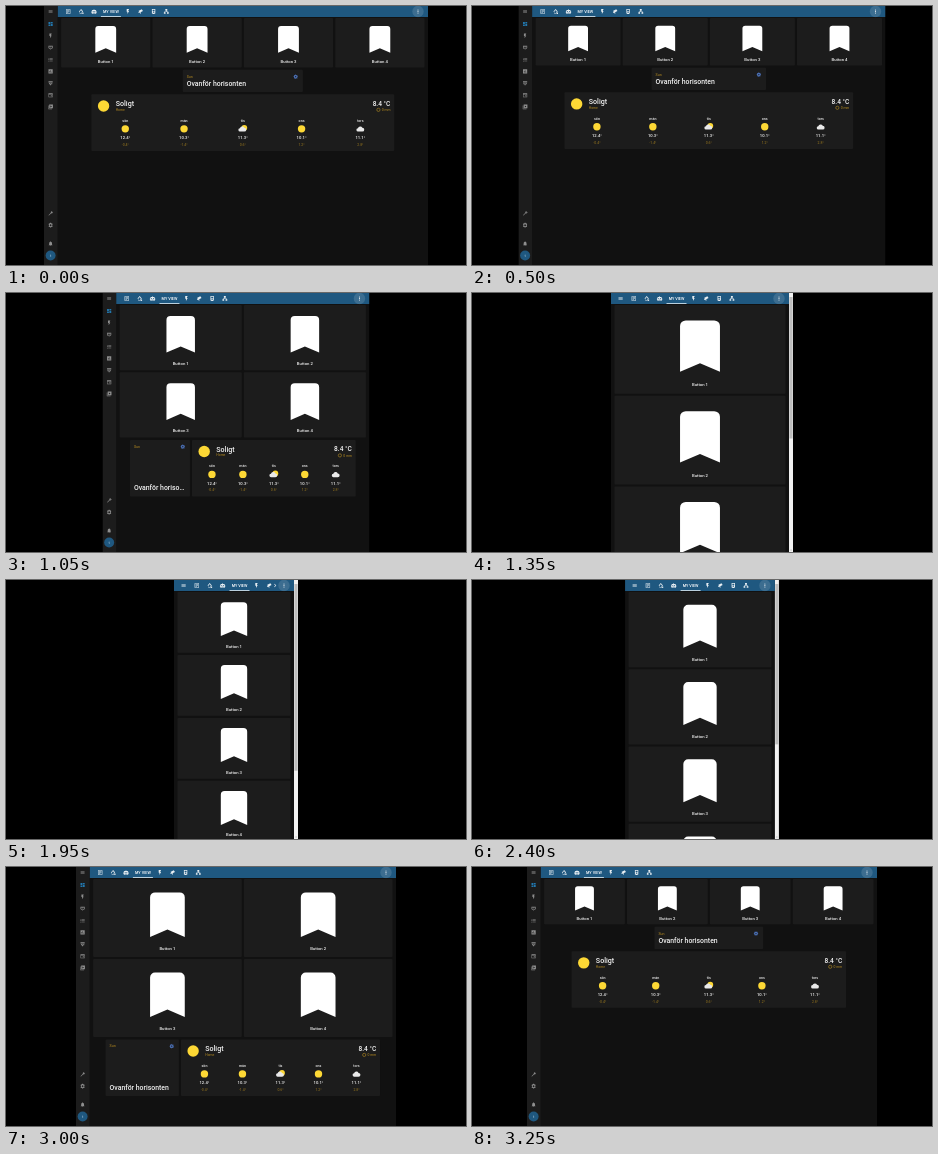
Animation, 460 px wide and 259 px high, one loop 3300 ms. Source, as an HTML page with a canvas:

```html
<!DOCTYPE html>
<html lang="sv">
<head>
<meta charset="utf-8">
<title>Responsive dashboard</title>
<style>
html, body { margin: 0; width: 100%; height: 100%; overflow: hidden; background: #000; }
canvas { display: block; width: 460px; height: 259px; }
</style>
</head>
<body>
<canvas id="stage"></canvas>
<script>
const W = 460, H = 259, LOOP = 3300, STEP = 50;
const canvas = document.getElementById('stage');
const ctx = canvas.getContext('2d');
const dpr = window.devicePixelRatio || 1;
canvas.width = W * dpr;
canvas.height = H * dpr;

const BAR = '#1f5880', PAGE = '#111', CARD = '#1c1c1c', GOLD = '#b88d20', SUN = '#fdd835', GREY = '#8f8f8f';
const RAIL = 13.6, PAD = 3.5, GAP = 2.1, TOP = 12;

// 24-unit icon shapes
const shapes = {
  bookmark: 'M17 3H7A2 2 0 0 0 5 5V21L12 18L19 21V5A2 2 0 0 0 17 3Z',
  menu: 'M3 6H21V8H3ZM3 11H21V13H3ZM3 16H21V18H3Z',
  board: 'M13 3V9H21V3ZM13 21H21V11H13ZM3 21H11V15H3ZM3 13H11V3H3Z',
  flash: 'M7 2V13H10V22L17 10H13L17 2Z',
  list: 'M3 3H21V21H3ZM5 5V19H19V5ZM7 7H17V9H7ZM7 11H17V13H7ZM7 15H13V17H7Z',
  lamp: 'M12 2L20 11V14H18V20H6V14H4V11ZM11 7L7 12V18H14V13H17V11ZM15 16H22V22H15Z',
  robot: 'M11 2H13V6H18A3 3 0 0 1 21 9V12H23V17H21V21H3V17H1V12H3V9A3 3 0 0 1 6 6H11ZM7 10V14H10V10ZM14 10V14H17V10ZM7 17V19H17V17Z',
  camera: 'M2 10L16 3L21 10L11 15L13 20H9L7 16L3 18L2 15L6 13Z',
  server: 'M5 2H19V20H16V22H8V20H5ZM8 5V10H16V5ZM9 12V17H15V12Z',
  network: 'M8 2H16V9H13V12H20V15H22V21H15V15H18V14H6V15H9V21H2V15H4V12H11V9H8Z',
  badge: 'M3 4H21V13L17 18H14L12 21L10 18H7L3 13ZM6 7V12L8 15H16L18 12V7ZM8 8H16V10H8Z',
  rows: 'M3 5H6V8H3ZM8 5H21V7H8ZM3 11H6V14H3ZM8 11H21V13H8ZM3 17H6V20H3ZM8 17H21V19H8Z',
  chart: 'M3 3H21V21H3ZM7 10V17H9V10ZM11 7V17H13V7ZM15 13V17H17V13Z',
  store: 'M3 3H21V9H3ZM5 11H19V16H14V21H10V16H5ZM8 12V14H16V12Z',
  calendar: 'M3 4H21V21H3ZM5 9V19H19V9ZM13 13H17V17H13Z',
  media: 'M6 2H22V18H6ZM11 6V14L18 10ZM2 6H4V20H18V22H2Z',
  wrench: 'M3 19L13 9A5 5 0 0 1 20 3L17 6L19 8L22 5A5 5 0 0 1 15 11L5 21Z',
  cog: 'M10 2H14L15 5L18 4L21 8L19 10V14L21 16L18 20L15 19L14 22H10L9 19L6 20L3 16L5 14V10L3 8L6 4L9 5ZM12 8A4 4 0 0 0 12 16A4 4 0 0 0 12 8Z',
  bell: 'M11 2H13V4A6 6 0 0 1 18 10V16L20 18V19H4V18L6 16V10A6 6 0 0 1 11 4ZM10 20H14A2 2 0 0 1 10 20Z',
  more: 'M12 4A2 2 0 0 0 12 8A2 2 0 0 0 12 4ZM12 10A2 2 0 0 0 12 14A2 2 0 0 0 12 10ZM12 16A2 2 0 0 0 12 20A2 2 0 0 0 12 16Z',
  next: 'M8 6L10 4L18 12L10 20L8 18L14 12Z',
  bright: 'M12 1L15 5L20 4L19 9L23 12L19 15L20 20L15 19L12 23L9 19L4 20L5 15L1 12L5 9L4 4L9 5ZM12 9A3 3 0 0 0 12 15A3 3 0 0 0 12 9Z',
  cloud: 'M6 20A5 5 0 0 1 5 10A7 7 0 0 1 18 9A5.5 5.5 0 0 1 18 20Z'
};
const paths = {};
for (const k in shapes) paths[k] = new Path2D(shapes[k]);

const days = [
  ['sön', 'sun', '12.4°', '-0.4°'],
  ['mån', 'sun', '10.3°', '-1.4°'],
  ['tis', 'partly', '11.3°', '0.6°'],
  ['ons', 'sun', '10.1°', '1.2°'],
  ['tors', 'cloud', '11.1°', '2.8°']
];

// window width over time
const keys = [[0, 384], [550, 364], [750, 322], [1100, 256], [1350, 182], [1650, 128],
  [1950, 124], [2200, 124], [2650, 225], [2750, 253], [3000, 320], [3250, 350]];
const slope = i => (keys[i + 1][1] - keys[i][1]) / (keys[i + 1][0] - keys[i][0]);
const tangent = keys.map((k, i) => {
  if (i === 0) return 0;
  if (i === keys.length - 1) return slope(i - 1);
  const a = slope(i - 1), b = slope(i);
  return a * b > 0 ? 2 * a * b / (a + b) : 0;
});

function widthAt(t) {
  let i = 0;
  while (i < keys.length - 2 && t >= keys[i + 1][0]) i++;
  const [t0, a] = keys[i], [t1, b] = keys[i + 1];
  const d = t1 - t0, u = Math.min(1, (t - t0) / d), v = 1 - u;
  return a * v * v * (1 + 2 * u) + b * u * u * (3 - 2 * u)
    + d * u * v * (tangent[i] * v - tangent[i + 1] * u);
}

function rect(x, y, w, h, color) {
  ctx.fillStyle = color;
  ctx.fillRect(x, y, w, h);
}

function card(x, y, w, h) {
  ctx.fillStyle = CARD;
  ctx.beginPath();
  ctx.roundRect(x, y, w, h, 1);
  ctx.fill();
}

function disc(x, y, r, color) {
  ctx.fillStyle = color;
  ctx.beginPath();
  ctx.arc(x, y, r, 0, 7);
  ctx.fill();
}

function icon(name, x, y, size, color) {
  ctx.save();
  ctx.translate(x - size / 2, y - size / 2);
  ctx.scale(size / 24, size / 24);
  ctx.fillStyle = color;
  ctx.fill(paths[name], 'evenodd');
  ctx.restore();
}

function font(size, weight) {
  ctx.font = `${weight} ${size}px Roboto, sans-serif`;
}

// y is the middle of the capitals
function text(str, x, y, size, color = '#f2f2f2', align = 'left', weight = 500) {
  font(size, weight);
  ctx.textAlign = align;
  ctx.fillStyle = color;
  ctx.fillText(str, x, y + size * 0.355);
}

function fit(str, max, size) {
  font(size, 500);
  if (ctx.measureText(str).width <= max) return str;
  while (str && ctx.measureText(str + '…').width > max) str = str.slice(0, -1);
  return str.trimEnd() + '…';
}

function rail(x) {
  const mid = x + 6.6;
  rect(x, 0, RAIL, H, CARD);
  icon('menu', mid, 5.5, 5.2, GREY);
  ['board', 'flash', 'badge', 'rows', 'chart', 'store', 'calendar', 'media'].forEach((n, i) =>
    icon(n, mid, 18 + i * 11.85, 5.6, i ? GREY : '#2277ad'));
  icon('wrench', mid, 207.5, 5.6, GREY);
  icon('cog', mid, 219.2, 5.6, GREY);
  icon('bell', mid, 237.5, 5.6, GREY);
  disc(mid, 249.5, 5, BAR);
  text('t', mid, 249.3, 4, '#8fb3cc', 'center');
}

function toolbar(x, right, narrow) {
  rect(x, 0, right - x, 11, BAR);
  const tight = right - x < 140;
  ctx.save();
  ctx.beginPath();
  ctx.rect(x, 0, right - x - (tight ? 21.5 : 16), 11);
  ctx.clip();
  let left = x;
  if (narrow) {
    icon('menu', x + 9.6, 5.5, 5.6, '#e8eef2');
    left += 12.2;
  }
  const tabs = [['list', 10.6], ['lamp', 23.5], ['robot', 36.4], ['flash', 70.3],
    ['camera', 83.2], ['server', 96], ['network', 108.7]];
  for (const [n, dx] of tabs) icon(n, left + dx, 5.5, 5.8, '#e8eef2');
  text('MY VIEW', left + 53.3, 5.5, 3.85, '#fff', 'center');
  rect(left + 43.3, 10, 20, 1, '#b9cfdd');
  ctx.restore();
  if (tight) icon('next', right - 19, 5.5, 5, '#e8eef2');
  disc(right - 10, 5.5, 5.7, 'rgba(255,255,255,.13)');
  icon('more', right - 10, 5.5, 6, '#fff');
}

function button(n, x, y, w, h) {
  const size = w * 0.4, top = y + w * 0.04, mid = x + w / 2;
  card(x, y, w, h);
  icon('bookmark', mid, top + size / 2, size, '#fff');
  text('Button ' + n, mid, top + size + 4.4, 4.25, '#f2f2f2', 'center');
}

function sunCard(x, y, w, h) {
  card(x, y, w, h);
  text('Sun', x + 4, y + 6.8, 3.6, GOLD, 'left', 400);
  icon('bright', x + w - 7.2, y + 6.8, 5.2, '#4a6fb5');
  text(fit('Ovanför horisonten', w - 7, 6.9), x + 4, y + h - 8.7, 6.9);
}

function sky(kind, x, y) {
  if (kind === 'sun') return disc(x, y, 3.7, SUN);
  if (kind === 'partly') disc(x + 1.5, y - 1, 2.9, SUN);
  icon('cloud', x - (kind === 'partly' ? 0.5 : 0), y, 8.2, '#e9e9e9');
}

function weather(x, y, w) {
  const right = x + w - 3.8;
  card(x, y, w, 56.6);
  disc(x + 12.2, y + 11.6, 5.7, SUN);
  text('Soligt', x + 24.3, y + 9.4, 7.1);
  text('Home', x + 24.3, y + 15.3, 3.4, GOLD, 'left', 400);
  text('8.4 °C', right, y + 9.2, 6.6, '#f2f2f2', 'right');
  text('0 mm', right, y + 15.7, 3.4, GOLD, 'right', 400);
  ctx.strokeStyle = GOLD;
  ctx.lineWidth = 0.6;
  ctx.beginPath();
  ctx.arc(right - 12, y + 15.5, 1.6, 0, 7);
  ctx.stroke();
  const gap = (w - 9) / 5;
  days.forEach(([day, kind, high, low], i) => {
    const mid = x + w / 2 + (i - 2) * gap;
    text(day, mid, y + 26, 3.6, '#f2f2f2', 'center');
    sky(kind, mid, y + 34.5);
    text(high, mid, y + 43.6, 4.2, '#f2f2f2', 'center');
    text(low, mid, y + 50, 3.5, '#98771f', 'center', 400);
  });
}

function scrollbar(x, total) {
  rect(x, 0, 4, H, '#f1f1f1');
  rect(x + 0.4, 4, 3.2, (H - 8) * H / total, '#bdbdbd');
  icon('next', x + 2, 257, 2, '#555');
}

function draw(t) {
  const w = widthAt(t), x0 = (W - w) / 2, x1 = x0 + w;
  const narrow = w < 205;
  const cols = narrow ? 1 : w < 336 ? 2 : 4;
  const left = narrow ? x0 : x0 + RAIL;
  const right = narrow ? x1 - 4 : x1;
  const inner = right - left - 2 * PAD, x = left + PAD;
  const bw = (inner - (cols - 1) * GAP) / cols, bh = bw * 0.48 + 6.6;

  ctx.setTransform(dpr, 0, 0, dpr, 0, 0);
  rect(0, 0, W, H, '#000');
  ctx.save();
  ctx.beginPath();
  ctx.rect(x0, 0, w, H);
  ctx.clip();
  rect(x0, 0, w, H, PAGE);

  for (let i = 0; i < 4; i++) {
    button(i + 1, x + (i % cols) * (bw + GAP), TOP + Math.floor(i / cols) * (bh + GAP), bw, bh);
  }
  const y = TOP + (4 / cols) * (bh + GAP) + 0.3;
  if (cols === 4) {
    sunCard(x + inner / 3 + 0.5, y, inner / 3 - 1, 22.2);
    weather(x + inner / 12, y + 24.5, inner * 5 / 6);
  } else if (cols === 2) {
    const unit = inner / 12;
    sunCard(x + unit / 2, y, unit * 3 - 1.5, 56.6);
    weather(x + unit * 3.5 + 0.5, y, unit * 8 - 0.5);
  } else {
    scrollbar(right, y + 84);
  }
  toolbar(left, right, narrow);
  // the side rail fills in late while the window grows
  const pending = t >= 2200 && t < 2750;
  if (!narrow && !pending) rail(x0);
  ctx.restore();
}

let start;
function tick(now) {
  if (start === undefined) start = now;
  const t = (now - start) % LOOP;
  draw(Math.floor(t / STEP) * STEP);
  requestAnimationFrame(tick);
}
draw(0);
requestAnimationFrame(tick);
</script>
</body>
</html>
```
